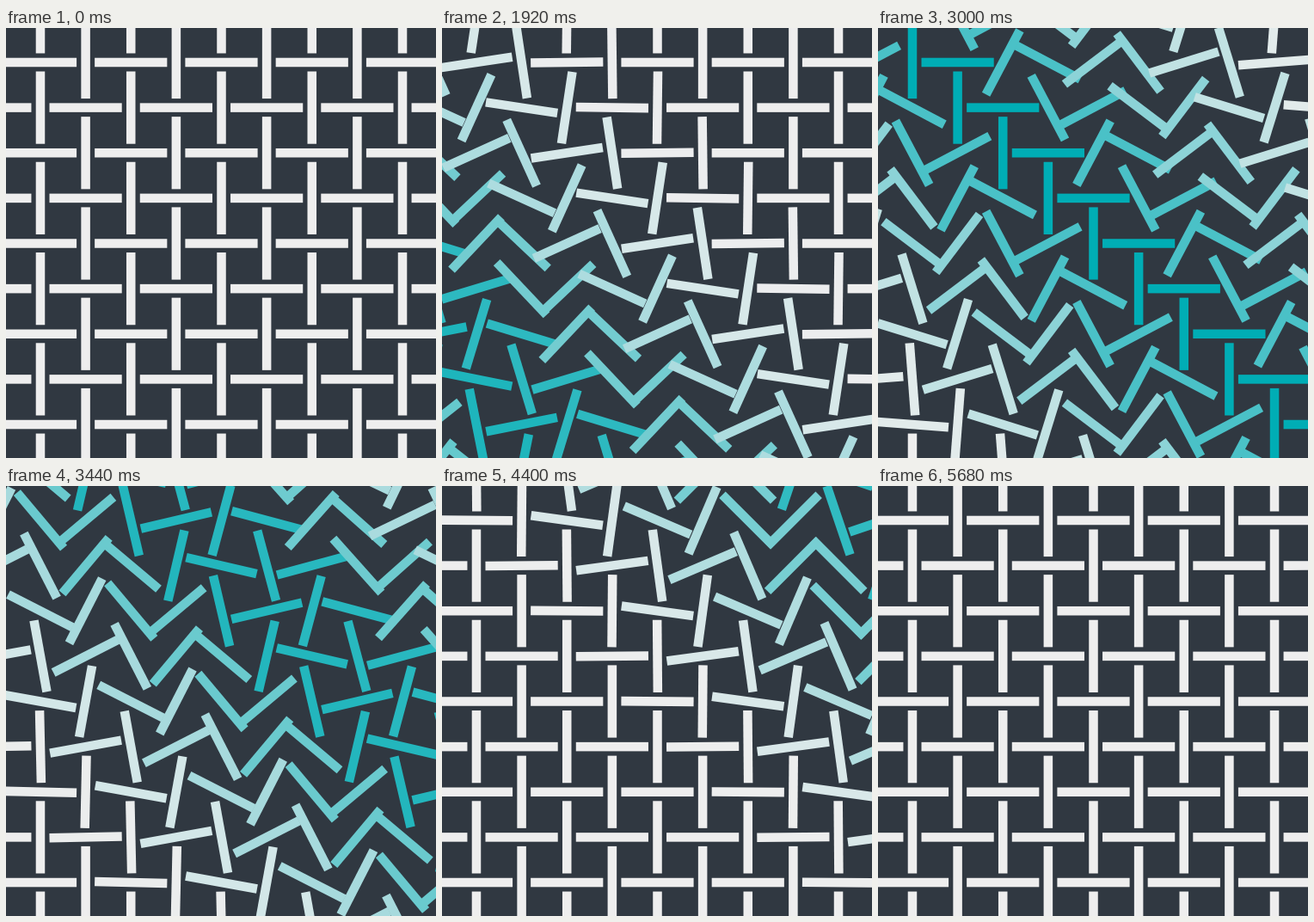
Recreate the animation shown at these times as an HTML page with a canvas. Size 500x500 px, loop 6 s.

```html
<!DOCTYPE html>
<html lang="en">
<head>
<meta charset="utf-8">
<title>Weave</title>
<style>
  html, body { margin: 0; width: 100%; height: 100%; overflow: hidden; background: #303841; }
  canvas { display: block; width: 500px; height: 500px; }
</style>
</head>
<body>
<canvas id="stage" width="500" height="500"></canvas>
<script>
const ctx = document.getElementById('stage').getContext('2d');

const LOOP = 6000, TURN = 3000, STAGGER = 300;
const MID = 250.5, PITCH = 500 / 9.5;
const LENGTH = PITCH * 1.6, WIDTH = PITCH / 5;
const PALE = [238, 238, 238], TEAL = [0, 173, 181];

const clamp = v => Math.min(1, Math.max(0, v));
const easeSine = p => (1 - Math.cos(Math.PI * p)) / 2;
const mix = w => `rgb(${PALE.map((c, n) => Math.round(c + (TEAL[n] - c) * w))})`;

// Odd rows turn clockwise, even rows counter-clockwise.
const bars = [];
for (let row = -1; row <= 9; row++) {
  for (let col = -1; col <= 9; col++) {
    bars.push({
      x: MID + (col - 4) * PITCH,
      y: MID + (row - 4) * PITCH,
      rest: (row + col) % 2 ? Math.PI / 2 : 0,
      spin: row % 2 ? Math.PI : -Math.PI,
      delay: (Math.floor((col - row) / 2) + 5) * STAGGER
    });
  }
}

function draw(time) {
  ctx.setTransform(1, 0, 0, 1, 0, 0);
  ctx.fillStyle = '#303841';
  ctx.fillRect(0, 0, 500, 500);
  for (const { x, y, rest, spin, delay } of bars) {
    const turn = easeSine(clamp((time - delay) / TURN));
    ctx.setTransform(1, 0, 0, 1, x, y);
    ctx.rotate(rest + spin * turn);
    ctx.fillStyle = mix(1 - Math.abs(2 * turn - 1));
    ctx.fillRect(-LENGTH / 2, -WIDTH / 2, LENGTH, WIDTH);
  }
}

let start;
function tick(now) {
  start ??= now;
  draw((now - start) % LOOP);
  requestAnimationFrame(tick);
}
draw(0);
requestAnimationFrame(tick);
</script>
</body>
</html>
```
